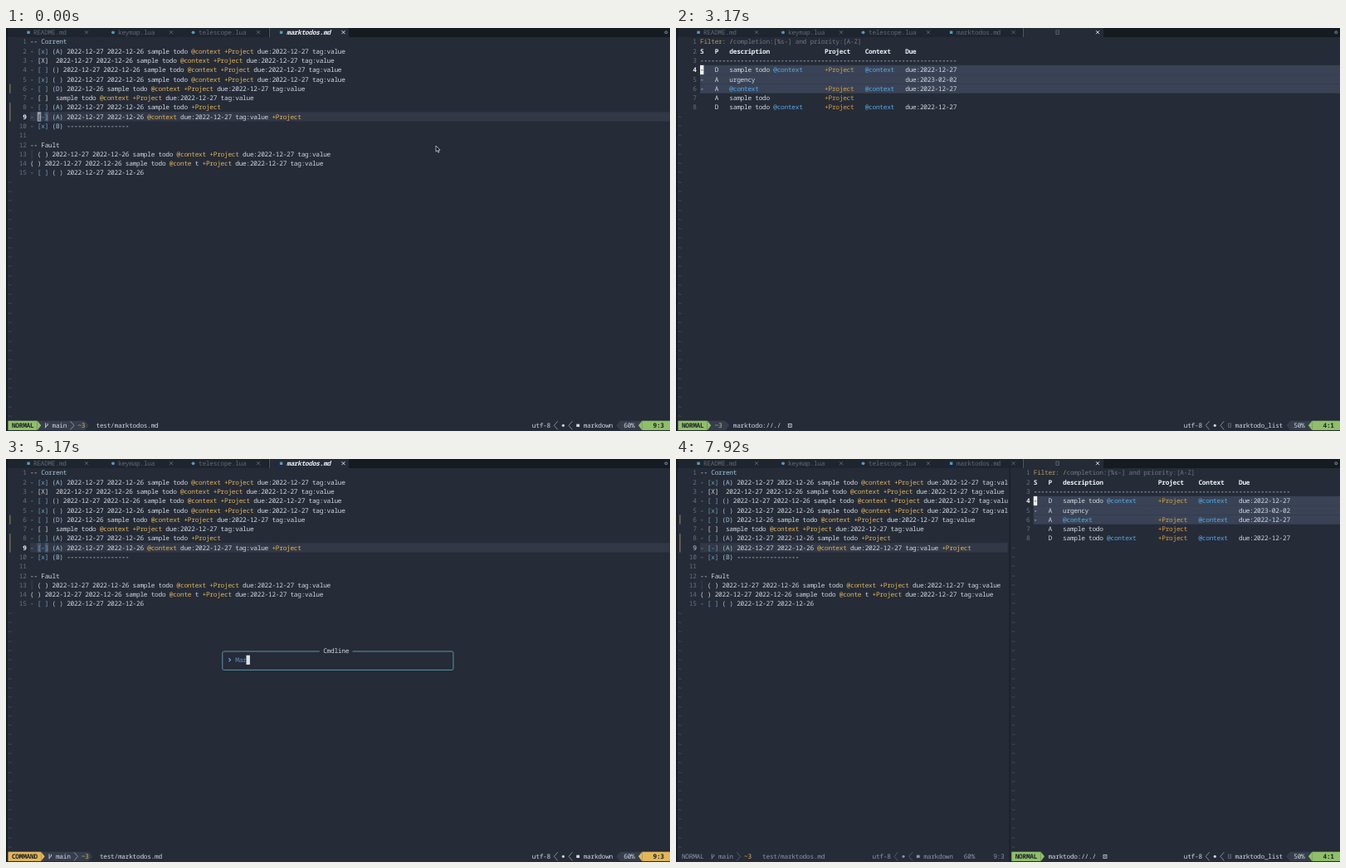
An HTML page with a canvas for the animation above (8 s loop, 800 by 486 pixels).

```html
<!DOCTYPE html>
<html lang="en">
<head>
<meta charset="utf-8">
<title>Todo list in the editor</title>
<style>
html, body { margin: 0; width: 100%; height: 100%; overflow: hidden; background: #252b37; }
canvas { display: block; }
</style>
</head>
<body>
<canvas id="stage" width="800" height="486"></canvas>
<script>
const ctx = document.getElementById('stage').getContext('2d');
const W = 800, H = 486, LOOP = 8000;
const CW = 4.415, RH = 11.285, X0 = 2.5, Y0 = 11;   // cell grid
const COLS = 180, GUTTER = 6, STATUS = 41, SPLIT = 91;
const C = {
  bg: '#252b37', tab: '#1f252e', fill: '#161a21', fg: '#d3d8e0', white: '#f0f2f5',
  dim: '#5f6979', num: '#687283', tilde: '#535d6d', line: '#323846', sel: '#394355',
  match: '#435369', green: '#8fbf68', gold: '#e2b659', orange: '#dca03c', blue: '#55abeb',
  check: '#6da3c6', prio: '#a6c2d8', part: '#363e4c', ink: '#1b212a', border: '#5796a8',
  icon: '#4f9cc4', sign: '#94805a', mute: '#8d96a4'
};

const colX = c => X0 + c * CW;
const rowY = r => Y0 + r * RH;

function rect(x, y, w, h, color) {
  ctx.fillStyle = color;
  ctx.fillRect(x, y, w, h);
}
// Fills n cells; the last column reaches the edge of the stage.
function cell(col, row, n, color) {
  const x = colX(col), right = col + n >= COLS ? W : colX(col + n);
  rect(x, rowY(row), right - x, RH, color);
}
function write(s, x, y, color, style = '') {
  ctx.font = style + ' 7.8px "Noto Sans Mono", "DejaVu Sans Mono", monospace';
  ctx.textRendering = 'geometricPrecision';
  ctx.letterSpacing = '0px';
  ctx.letterSpacing = (CW - ctx.measureText('0'.repeat(20)).width / 20) + 'px';
  ctx.fillStyle = color;
  ctx.fillText(s, x, y);
}
function text(s, col, row, color = C.fg, style) {
  write(s, colX(col), rowY(row) + 8.4, color, style);
}
function path(points, color, width = 0.7) {
  ctx.beginPath();
  points.forEach(([x, y], i) => i ? ctx.lineTo(x, y) : ctx.moveTo(x, y));
  ctx.strokeStyle = color;
  ctx.lineWidth = width;
  ctx.stroke();
}
function dot(x, y, r, color) {
  ctx.beginPath();
  ctx.arc(x, y, r, 0, Math.PI * 2);
  ctx.fillStyle = color;
  ctx.fill();
}
function box(x, y, w, h, color, width = 0.8) {
  ctx.strokeStyle = color;
  ctx.lineWidth = width;
  ctx.strokeRect(x, y, w, h);
}

// Tab bar
function closeMark(x, color) {
  path([[x - 2, 3.2], [x + 2, 7.2]], color, 0.9);
  path([[x - 2, 7.2], [x + 2, 3.2]], color, 0.9);
}
function page(x, y) {
  box(x - 1.6, y - 2.3, 3.4, 4.6, '#6b7584', 0.7);
  path([[x - 0.8, y], [x + 1, y]], '#6b7584', 0.6);
}
function tabs(listOpen) {
  rect(0, 0, W, Y0, C.fill);
  rect(X0, 0, listOpen ? 416 : 314, Y0, C.tab);
  const names = [['README.md', 27, 33, 97], ['keymap.lua', 129, 135, 199],
    ['telescope.lua', 225.5, 232, 304], ['marktodos.md', 331.5, 338, 406.5]];
  const from = listOpen ? 418 : 317;
  rect(from, 0, listOpen ? 97 : 96, Y0, C.bg);
  rect(from, 0, 1, Y0, '#4b5666');
  names.forEach(([name, ix, tx, cx], i) => {
    const on = i === 3 && !listOpen;
    if (name.endsWith('lua')) dot(ix, 5.3, 1.9, C.icon);
    else rect(ix - 1.6, 3.6, 3.4, 3.4, C.icon);
    write(name, tx, 8.1, on ? C.white : C.dim, on ? 'italic bold' : '');
    closeMark(cx, on ? C.white : C.dim);
  });
  if (listOpen) {
    page(459.5, 5.2);
    closeMark(508, C.white);
  }
  dot(795.3, 5.3, 2, '#5b7186');
  dot(795.3, 5.3, 0.8, C.fill);
}

// Windows
function lineNumbers(col, count, current, active) {
  for (let i = 1; i <= count; i++) {
    const on = i === current;
    text(String(i).padStart(2), col + 3, i - 1,
      on ? (active ? C.white : C.fg) : C.num, on && active ? 'bold' : '');
  }
  for (let r = count; r < STATUS; r++) text('~', col, r, C.tilde);
}

const DATES = '2022-12-27 2022-12-26', TAIL = '+Project due:2022-12-27 tag:value';
const FULL = 'sample todo @context ' + TAIL;
const TODOS = [
  '-- Corrent',
  `- [x] (A) ${DATES} ${FULL}`,
  `- [X]  ${DATES} ${FULL}`,
  `- [ ] () ${DATES} ${FULL}`,
  `- [x] ( ) ${DATES} ${FULL}`,
  `- [ ] (D) 2022-12-26 ${FULL}`,
  `- [ ]  ${FULL}`,
  `- [ ] (A) ${DATES} sample todo +Project`,
  `- [-] (A) ${DATES} @context due:2022-12-27 tag:value +Project`,
  '- [x] (B) ' + '-'.repeat(17),
  '',
  '-- Fault',
  `  ( ) ${DATES} ${FULL}`,
  `( ) ${DATES} sample todo @conte t ${TAIL}`,
  `- [ ] ( ) ${DATES}`
];

function todoLine(line, row) {
  let col = GUTTER, marked = false;
  for (const part of line.split(/(^-(?= )|\[[x -]\](?= \()|\([A-D ]?\)|[@+]\w+)/)) {
    let color = C.fg;
    if (/^[@+]/.test(part)) color = C.gold;
    else if (part === '-') color = '#7d95a8';
    else if (part[0] === '[') { color = C.check; marked = true; }
    else if (part[0] === '(' && marked) color = C.prio;
    if (part) text(part, col, row, color);
    col += part.length;
  }
}
// cursor: a block colour, 'match' for the brackets alone, or null when inactive
function todoWindow(width, cursor) {
  ctx.save();
  ctx.beginPath();
  ctx.rect(0, 0, width < COLS ? colX(width) : W, H);
  ctx.clip();
  cell(GUTTER, 8, width - GUTTER, C.line);
  if (cursor) {
    cell(8, 8, 1, C.match);
    cell(10, 8, 1, C.match);
  }
  rect(4.3, rowY(5), 1.1, RH, C.sign);
  rect(4.3, rowY(7), 1.1, RH * 2, C.sign);
  rect(30.8, rowY(12), 0.7, RH, '#465061');
  lineNumbers(0, TODOS.length, 9, cursor);
  TODOS.forEach((line, row) => {
    if (row) todoLine(line, row);
    else {
      text('--', GUTTER, 0, C.fg);
      text('Corrent', GUTTER + 3, 0, '#a4c8df');
    }
  });
  if (cursor && cursor !== 'match') {
    cell(8, 8, 1, cursor);
    text('[', 8, 8, C.ink);
  }
  ctx.restore();
}

const ITEMS = [
  ['-', 'D', 'sample todo', '@context', 1, '2022-12-27'],
  ['-', 'A', 'urgency', '', 0, '2023-02-02'],
  ['-', 'A', '', '@context', 1, '2022-12-27'],
  ['', 'A', 'sample todo', '', 1, ''],
  ['', 'D', 'sample todo', '@context', 1, '2022-12-27']
];
function listWindow(col) {
  const at = col + GUTTER;
  for (let row = 3; row < 6; row++) cell(at, row, COLS - at, C.sel);
  lineNumbers(col, 8, 4, true);
  text('Filter: /', at, 0, '#b59a5f');
  text('completion:[%s-] and priority:[A-Z]', at + 9, 0, '#6f7886');
  [['S', 0], ['P', 4], ['description', 8], ['Project', 34], ['Context', 45], ['Due', 56]]
    .forEach(([s, c]) => text(s, at + c, 1, C.white, 'bold'));
  text('-'.repeat(70), at, 2);
  ITEMS.forEach(([state, prio, desc, tag, project, due], i) => {
    const row = i + 3;
    text(state, at, row);
    text(prio, at + 4, row);
    text(desc, at + 8, row);
    text(tag, at + 8 + (desc ? desc.length + 1 : 0), row, C.blue);
    if (project) text('+Project', at + 34, row, C.orange);
    text(tag, at + 45, row, C.blue);
    if (due) text('due:' + due, at + 56, row);
  });
  cell(at, 3, 1, C.white);
  text('-', at, 3, C.ink);
}

// Status line
const midY = rowY(STATUS) + RH / 2;
function arrow(col, dir, color) {
  const x = colX(dir > 0 ? col : col + 1), y = rowY(STATUS);
  ctx.beginPath();
  ctx.moveTo(x, y);
  ctx.lineTo(x + dir * CW, midY);
  ctx.lineTo(x, y + RH);
  ctx.fillStyle = color;
  ctx.fill();
}
function chevron(col, dir, color) {
  const x = colX(dir > 0 ? col : col + 1), y = rowY(STATUS);
  path([[x, y + 0.5], [x + dir * CW, midY], [x, y + RH - 0.5]], color, 0.8);
}
function branch(col, color) {
  const x = colX(col) + 1;
  path([[x, midY - 3], [x, midY + 3]], color, 0.9);
  path([[x, midY + 1.5], [x + 2.5, midY - 0.2], [x + 2.5, midY - 2.5]], color, 0.9);
}
function status(col, end, mode, o) {
  const on = o.active, accent = mode === 'COMMAND' ? C.gold : C.green;
  const ink = on ? C.fg : C.mute, edge = on ? '#9aa3b0' : C.dim;
  const strong = on ? [C.ink, 'bold'] : [ink];
  const put = (s, c, color = ink, style) => text(s, c, STATUS, color, style);
  let c = col + mode.length + 2;
  if (on) {
    const n = (o.branch ? 8 : 0) + (o.diff ? 5 : 0);
    cell(col, STATUS, c - col, accent);
    if (n) {
      cell(c, STATUS, n, C.part);
      arrow(c + n, 1, C.part);
    }
    arrow(c, 1, accent);
    c++;
  }
  put(mode, col + 1, ...strong);
  if (o.branch) {
    branch(c + 1, ink);
    put('main', c + 3);
    chevron(c + 8, 1, edge);
    c += 9;
  }
  if (o.diff) {
    put('~3', c + 1, C.gold);
    c += 5;
  }
  put(o.file, c + 1);
  if (o.list) {
    const x = colX(c + o.file.length + 3) + 0.3;
    box(x, midY - 2, 4, 4, ink);
    rect(x + 1.4, midY - 0.6, 1.2, 1.2, ink);
  }

  const t = end - 15 - o.type.length;
  put('utf-8', t - 14);
  chevron(t - 8, -1, edge);
  dot(colX(t - 6) + 2.2, midY, 1.6, ink);
  chevron(t - 4, -1, edge);
  if (o.list) page(colX(t - 2) + 2.2, midY);
  else rect(colX(t - 2) + 0.4, midY - 1.7, 3.8, 3.4, ink);
  put(o.type, t);
  if (on) {
    arrow(end - 14, -1, C.part);
    cell(end - 13, STATUS, 6, C.part);
    arrow(end - 8, -1, accent);
    cell(end - 7, STATUS, 7, accent);
  }
  put(o.percent, end - 12);
  put(o.pos, end - 4, ...strong);
}

// Command popup
function popup(typed) {
  const l = colX(58.5), r = colX(121.5);
  ctx.beginPath();
  ctx.roundRect(l, 232, r - l, 22.4, 1.8);
  ctx.strokeStyle = C.border;
  ctx.lineWidth = 1;
  ctx.stroke();
  cell(85, 19, 9, C.bg);
  text('Cmdline', 86, 19);
  const x = colX(60) + 1, y = rowY(20) + RH / 2;
  path([[x, y - 2.1], [x + 2.1, y], [x, y + 2.1]], C.blue, 1.1);
  text(typed.slice(0, 8), 62, 20, '#5c93bd');
  text(typed.slice(8), 70, 20);
  cell(62 + typed.length, 20, 1, '#dfe3e9');
}
function mouse(x, y) {
  ctx.beginPath();
  [[0, 0], [0, 7.2], [1.6, 5.7], [2.8, 8.2], [3.9, 7.7], [2.8, 5.2], [5, 5.2]]
    .forEach(([dx, dy]) => ctx.lineTo(x + dx, y + dy));
  ctx.closePath();
  ctx.fillStyle = '#0c0e12';
  ctx.fill();
  ctx.strokeStyle = '#e8eaee';
  ctx.lineWidth = 0.7;
  ctx.stroke();
}

const TODO_BAR = { active: true, branch: true, diff: true, file: 'test/marktodos.md', type: 'markdown', percent: '60%', pos: '9:3' };
const LIST_BAR = { active: true, list: true, file: 'marktodo://./', type: 'marktodo_list', percent: '50%', pos: '4:1' };

// Each run: command mode, popup, key interval, result, settled status, end
const RUNS = [
  { mode: 165, popup: 245, key: 165, open: 2575, settle: 3745, end: 3995, cmd: 'Marktodo full' },
  { mode: 4495, popup: 4575, key: 170, open: 6995, settle: 7910, end: LOOP, cmd: 'Marktodo vert', split: true }
];

function draw(t) {
  const run = RUNS.find(r => t < r.end);
  const open = t >= run.open;
  rect(0, 0, W, H, C.bg);
  tabs(open);
  if (open) {
    const col = run.split ? SPLIT : 0;
    if (run.split) {
      todoWindow(SPLIT - 1, null);
      status(0, SPLIT - 1, 'NORMAL', { ...TODO_BAR, active: false });
      rect(colX(SPLIT - 0.5) - 0.4, Y0, 0.9, H - Y0, '#171b22');
    }
    listWindow(col);
    status(col, COLS, 'NORMAL', { ...LIST_BAR, diff: t < run.settle });
  } else {
    const shown = t >= run.popup;
    todoWindow(COLS, shown ? 'match' : t < 75 ? '#98a1af' : C.white);
    status(0, COLS, t >= run.mode ? 'COMMAND' : 'NORMAL', TODO_BAR);
    if (shown) popup(run.cmd.slice(0, Math.floor((t - run.popup) / run.key)));
    if (t < RUNS[0].popup) mouse(518, 142);
  }
  rect(0, 0, 1.8, H, '#171b22');
}

const start = performance.now();
function tick() {
  draw((performance.now() - start) % LOOP);
  requestAnimationFrame(tick);
}
tick();
</script>
</body>
</html>
```
